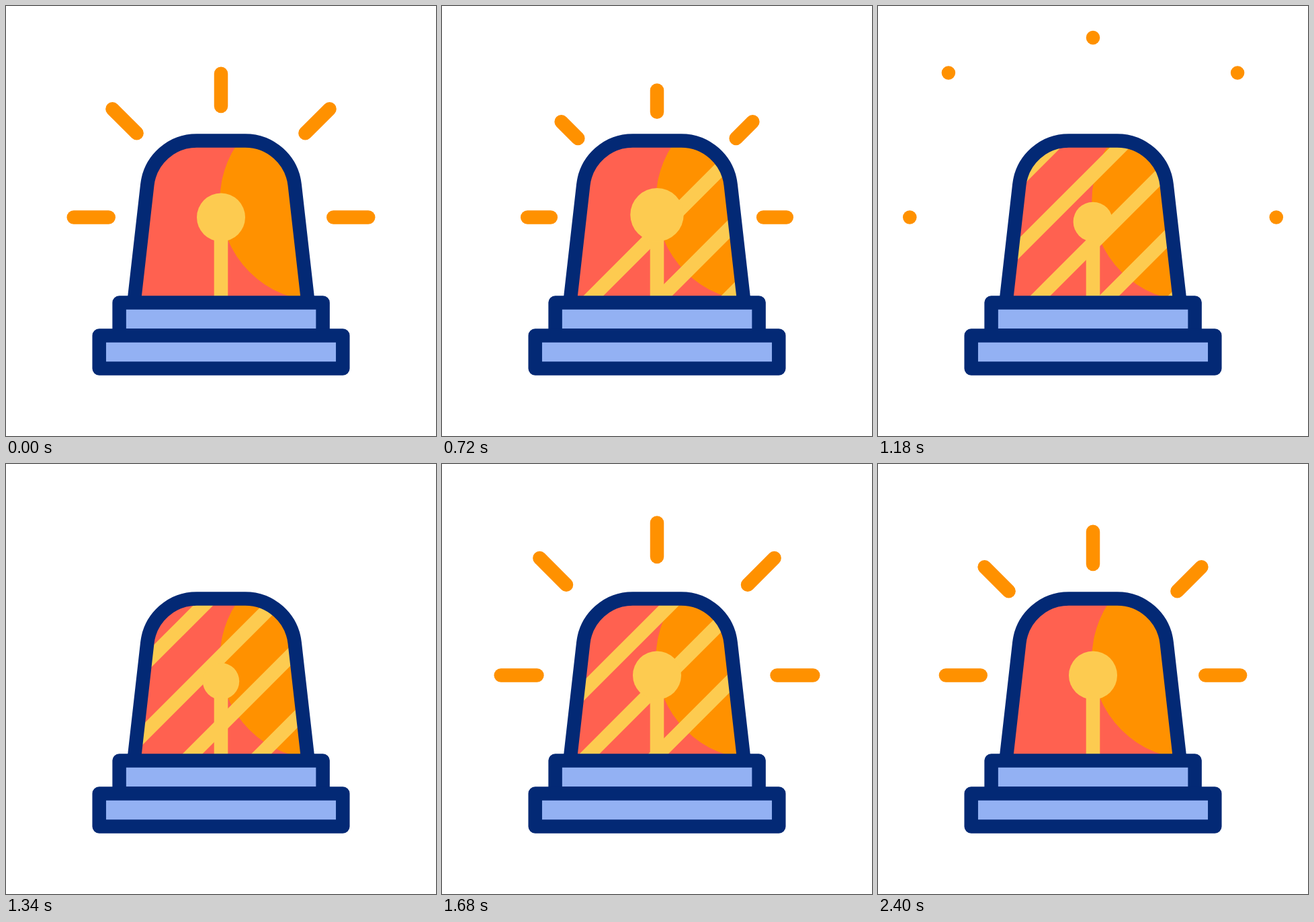
Write an HTML page that moves like this. It is 640 px wide and 640 px high and loops after 2420 ms.

```html
<!DOCTYPE html>
<html lang="en">
<head>
<meta charset="utf-8">
<title>Siren</title>
<style>
  html, body { margin: 0; width: 100%; height: 100%; overflow: hidden; background: #fff; }
  svg { display: block; width: 100%; height: 100%; }
  .navy { stroke: #032975; stroke-width: 20.5; stroke-linejoin: round; }
  .base { fill: #93b1f3; }
  .glow { fill: #fdcb50; }
  #stripes { stroke: #fdcb50; stroke-width: 21; }
  #rays { stroke: #ff9100; stroke-width: 20.5; stroke-linecap: round; }
</style>
</head>
<body>
<svg viewBox="0 0 640 640">
  <defs>
    <path id="dome" d="M190.6 440 L210.3 266.2 A74.2 74.2 0 0 1 284 200.4 H356 A74.2 74.2 0 0 1 429.7 266.2 L449.4 440"/>
    <clipPath id="inside"><use href="#dome"/></clipPath>
  </defs>
  <g id="rays"></g>
  <g clip-path="url(#inside)">
    <rect x="180" y="190" width="280" height="250" fill="#ff6150"/>
    <circle cx="468.6" cy="289.5" r="150.3" fill="#ff9100"/>
    <g id="stripes"></g>
    <rect class="glow" x="309.7" y="335" width="20.6" height="100"/>
    <circle class="glow" id="bulb" cx="320"/>
  </g>
  <use href="#dome" class="navy" fill="none"/>
  <rect class="navy base" x="168.6" y="441.5" width="303" height="49"/>
  <rect class="navy base" x="138.7" y="490.4" width="362.6" height="49"/>
</svg>
<script>
const LOOP = 2420, BEAT = 800, GAP = 102.5;
const BIRTH = 610, DEATH = 1195;   // life of one burst of rays, in ms
const REST = 54.3;                 // outer end's distance from its goal at the beat

const $ = id => document.getElementById(id);
const mix = (a, b, u) => a + (b - a) * u;
const linear = u => u;
const smooth = u => u * u * (3 - 2 * u);

function set(el, attrs) {
  for (const k in attrs) el.setAttribute(k, attrs[k]);
}
function add(parent, tag, attrs = {}) {
  const el = document.createElementNS('http://www.w3.org/2000/svg', tag);
  set(el, attrs);
  return parent.appendChild(el);
}

// Eases from key to key, each a [time, value] pair.
function tween(keys, ease) {
  return t => {
    const i = Math.max(1, keys.findIndex(k => k[0] >= t));
    const [t0, a] = keys[i - 1], [t1, b] = keys[i];
    return mix(a, b, ease((t - t0) / (t1 - t0)));
  };
}

const radius = tween([[0, 36], [160, 36], [270, 40.2], [420, 27.2], [560, 27.2], [700, 40.2], [BEAT, 36]], smooth);
const sweep = tween([[0, 1537], [1180, 264], [1520, -95], [2400, -1060]], linear);

// Distances of a ray's two ends from its goal: it grows until the beat, then flies off.
function span(age, reach) {
  if (age < BEAT) {
    const u = (age - BIRTH) / (BEAT - BIRTH);
    return [mix(reach, REST, u), reach * (1 - .097 * u ** 3)];
  }
  const u = (age - BEAT) / 400;
  const out = REST * Math.max(0, 1 - u * 400 / 390) ** 1.2;
  return [out, Math.max(out, reach * .903 * (1 - smooth(u)))];
}

const rays = [];
function addRay(x, y, dx, dy, reach) {
  rays.push({ x, y, dx, dy, reach, el: add($('rays'), 'line') });
}
addRay(320, 46.5, 0, 1, 113.5);
for (const side of [-1, 1]) {
  addRay(320 + side * 273.4, 314.5, -side, 0, 117.5);
  addRay(320 + side * 215.7, 99, -side, 1, 100);
}

for (let i = -1; i <= 10; i++) {
  const x = i * GAP;
  add($('stripes'), 'line', { x1: x - 460, y1: 460, x2: x - 170, y2: 170 });
}

function draw(time) {
  const t = Math.min(time, 3 * BEAT), phase = t % BEAT;
  const r = radius(phase);
  set($('bulb'), { r, cy: 350.5 - r });
  set($('stripes'), { transform: `translate(${sweep(t)} 0)` });

  const age = phase < BIRTH ? phase + BEAT : phase;
  set($('rays'), { visibility: age < DEATH ? 'visible' : 'hidden' });
  for (const { x, y, dx, dy, reach, el } of rays) {
    const [out, back] = span(Math.min(age, DEATH), reach);
    set(el, { x1: x + dx * out, y1: y + dy * out, x2: x + dx * back, y2: y + dy * back });
  }
}

const start = performance.now();
function tick() {
  draw((performance.now() - start) % LOOP);
  requestAnimationFrame(tick);
}
tick();
</script>
</body>
</html>
```
